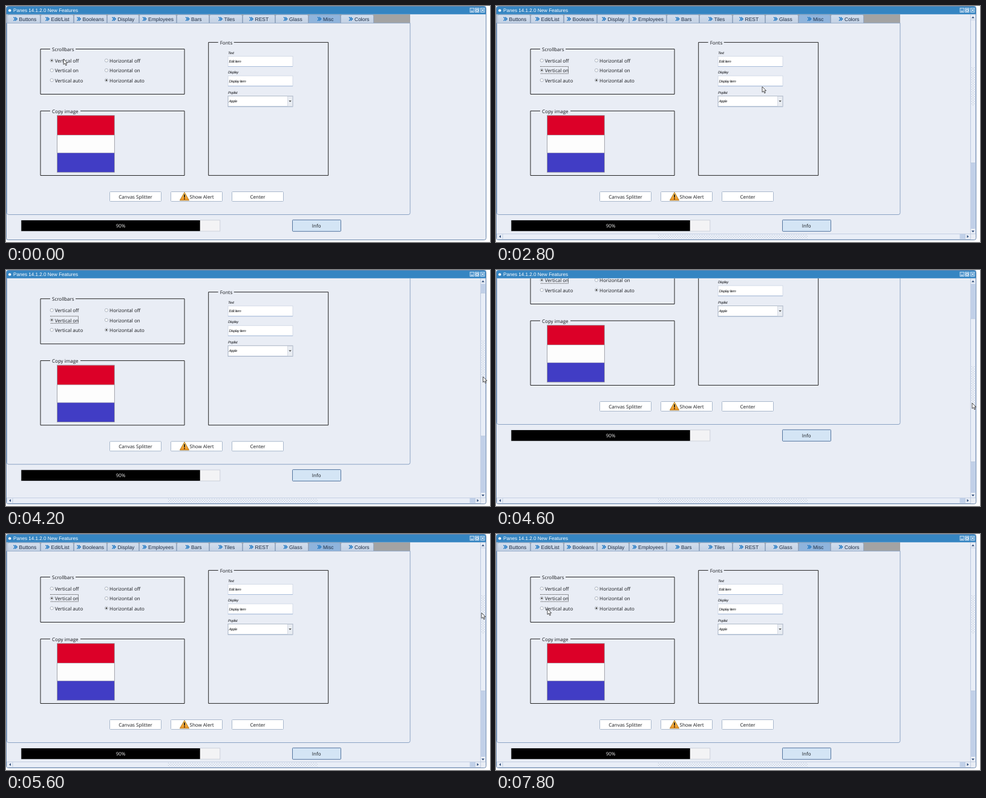
Recreate the animation shown at these times as an HTML page. Size 800 by 392 pixels, loop 8 s.

```html
<!DOCTYPE html>
<html lang="en">
<head>
<meta charset="utf-8">
<title>Panes demo</title>
<style>
  html, body { margin: 0; width: 100%; height: 100%; overflow: hidden; background: #fff; }
  svg { display: block; width: 800px; height: 392px; }
  text { font: 8px "Open Sans", sans-serif; fill: #16181c; text-rendering: geometricPrecision; white-space: pre; }
  .ui { font: 8.5px "Liberation Sans", Arial, sans-serif; fill: #1c2c44; }
  .bar { font: 8.1px "Liberation Sans", Arial, sans-serif; fill: #fff; }
  .hand { font: italic 6px "Liberation Sans", Arial, sans-serif; letter-spacing: -.4px; }
  .mid { text-anchor: middle; }
</style>
</head>
<body>
<svg id="stage" viewBox="0 0 800 392">
  <defs>
    <clipPath id="view"><rect x="1" y="14" width="792" height="374"/></clipPath>
    <linearGradient id="amber" x2="0" y2="1">
      <stop stop-color="#ffd56a"/><stop offset="1" stop-color="#ee8f1c"/>
    </linearGradient>
    <linearGradient id="tab" x2="0" y2="1">
      <stop stop-color="#d3deed"/><stop offset="1" stop-color="#c3d1e4"/>
    </linearGradient>
    <pattern id="grip" width="4" height="4" patternUnits="userSpaceOnUse">
      <path d="M0 0h1v1h-1zM2 2h1v1h-1z" fill="#b3bfd0"/>
    </pattern>
  </defs>
  <rect x=".5" y=".5" width="793" height="388" rx="3" fill="#e9edf5" stroke="#6d89ad"/>
  <g id="content" clip-path="url(#view)"><g id="page"></g></g>
  <path d="M1 13.8V3q0-2 2-2H791q2 0 2 2V13.8z" fill="#3585c2"/>
  <g id="title"></g>
  <g id="bars"></g>
  <path id="cursor" d="M0 0V9.2L2.2 7.2L3.8 10.8L5.3 10.1L3.8 6.7H6.6z" fill="#fff" stroke="#222" stroke-width=".8"/>
</svg>
<script>
const $ = id => document.getElementById(id);
const rect = (x, y, w, h, fill, stroke = 'none', extra = '') =>
  `<rect x="${x}" y="${y}" width="${w}" height="${h}" fill="${fill}" stroke="${stroke}" ${extra}/>`;
const path = (d, stroke, width = 1, fill = 'none') =>
  `<path d="${d}" fill="${fill}" stroke="${stroke}" stroke-width="${width}"/>`;
const text = (x, y, s, cls = '') => `<text x="${x}" y="${y}" class="${cls}">${s}</text>`;

const tabs = [
  ['Buttons', 2, 21.5], ['Edit/List', 57, 74.5], ['Booleans', 112, 126.5], ['Display', 167, 184.5],
  ['Employees', 220, 235], ['Bars', 282, 306], ['Tiles', 336, 360.5], ['REST', 391, 411.5],
  ['Glass', 445, 468], ['Misc', 500, 524], ['Colors', 553, 576]
];

function drawTab([name, x, textX], i) {
  const end = i + 1 < tabs.length ? tabs[i + 1][1] : 608;
  const chevron = dx => path(`M${textX - 9 + dx} 18.6l3 2.9l-3 2.9`, '#1c77c4', 1.4);
  return path(`M${x + .5} 28V16.5q0-2 2-2H${end - 2.5}q2 0 2 2V28`, '#8ea5c3', .8,
      name === 'Misc' ? '#8fb4dc' : 'url(#tab)') +
    chevron(0) + chevron(2.7) + text(textX, 24.6, name, 'ui');
}

function group(label, x, y, w, h, gap) {
  return path(`M${x + 16} ${y}H${x}v${h}h${w}v${-h}H${x + 16 + gap}`, '#222') +
    text(x + 19, y + 3.4, label);
}

function radio(x, y, label, id = '') {
  return `<circle cx="${x}" cy="${y}" r="2.6" fill="#fff" stroke="#9aa3b0" stroke-width=".8"/>` +
    (id ? `<circle id="${id}" cx="${x}" cy="${y}" r="1.2" fill="#222"/>` : '') +
    text(x + 5, y + 3.5, label);
}

const button = (x, label, labelX = x + 43) =>
  rect(x + .5, 308.5, 85, 16, '#fff', '#a9b8cc', 'rx="1"') + text(labelX, 319.8, label, 'mid');

function field(label, y, value, h = 17) {
  return text(367, y - 4, label, 'hand') + rect(367, y, 107, h, '#fff', '#ccd5e3', 'stroke-width=".8"') +
    path(`M367 ${y + h}h107`, '#a9bddb') + text(368.5, y + 10.5, value, 'hand');
}

$('page').innerHTML =
  rect(2, 14, 666, 14, '#a3a3a3') +
  path('M1.5 28.3H668V343.5q0 3-3 3H4.5q-3 0-3-3z', '#8ba3c4', 1, '#e9edf5') +
  tabs.map(drawTab).join('') +
  group('Scrollbars', 57, 71.5, 238, 75, 42) +
  radio(75.7, 90.5, 'Vertical off', 'offDot') +
  radio(75.7, 106.8, 'Vertical on', 'onDot') +
  radio(75.7, 123.2, 'Vertical auto') +
  radio(166, 90.5, 'Horizontal off') +
  radio(166, 106.8, 'Horizontal on') +
  radio(166, 123.2, 'Horizontal auto', 'autoDot') +
  '<path id="focus" d="M73 100.5H119.5V112.3H73" fill="none" stroke="#333" stroke-width=".8" stroke-dasharray="1.5 1"/>' +
  group('Copy image', 57, 174.3, 238, 107.2, 50) +
  rect(85, 182, 94, 32.5, '#dc0028') + rect(85, 214.5, 94, 29.5, '#fdfdfd') +
  rect(85, 244, 94, 32, '#413dc5') + rect(84.5, 181.8, 94.8, 94.4, 'none', '#8f8f98', 'stroke-width=".8"') +
  path('M85 214.5h94M85 244h94', '#a0a0a8', .6) +
  group('Fonts', 334.7, 60.4, 198, 221, 26) +
  field('Text', 83.5, 'Edit item') + field('Display', 116, 'Display item') +
  field('Poplist', 149.5, 'Apple', 17.5) +
  rect(367, 149.5, 107, 17.5, 'none', '#a9b3c2', 'stroke-width=".8"') +
  rect(465.5, 150, 8, 16.7, '#e9edf3', '#c3cad5', 'stroke-width=".6"') +
  path('M467.3 157h4.6l-2.3 2.5z', 'none', 0, '#555') +
  button(171, 'Canvas Splitter') + button(272, 'Show Alert', 323.5) + button(373, 'Center') +
  path('M295 309.5L302.6 322.8H287.4z', '#a8741c', .9, 'url(#amber)') +
  path('M295 313v5.2M295 319.6v1.6', '#111', 1.7) +
  rect(25, 355.8, 328.8, 18.2, '#f3f3f5', '#c5cad4', 'stroke-width=".8"') +
  rect(25.3, 356, 295.4, 17.8, '#000') +
  '<text x="189.5" y="367.9" class="mid" style="fill:#e8e8e8">90%</text>' +
  rect(473.5, 355.3, 80, 19, '#d4e5f5', '#54759f', 'rx="1"') + text(513.2, 367.9, 'Info', 'mid');

$('title').innerHTML =
  '<circle cx="6.2" cy="7.4" r="2.2" fill="#fff"/>' +
  text(12, 10.3, 'Panes 14.1.2.0 New Features', 'bar') +
  [767, 775.5, 784.5].map(x => rect(x, 3.5, 6.5, 7, '#5a9bd0', '#dcecf8', 'stroke-width=".8"')).join('') +
  path('M768.5 8.8h3.5M777 5.5h3.5v3.4H777zM786 5.3l3.5 3.5M789.5 5.3l-3.5 3.5', '#fff', 1);

const track = '#c1d0e8', thumb = '#e9eef7', edge = '#b4c3da', arrow = '#33507c';
$('bars').innerHTML =
  rect(784.3, 14, 8.5, 364.5, thumb, edge, 'stroke-width=".7"') +
  rect(784.6, 23, 8, 347, track) +
  `<g id="thumb">${rect(784.6, 23, 8, 237.5, thumb, edge, 'stroke-width=".7"')}${rect(785, 101, 7, 65, 'url(#grip)')}</g>` +
  path('M786 20.3h4.8l-2.4-3z', 'none', 0, arrow) + path('M786 373h4.8l-2.4 3z', 'none', 0, arrow) +
  rect(1.5, 378.7, 783, 8.6, thumb, edge, 'stroke-width=".7"') +
  rect(766.5, 379, 9, 8, track) + rect(267, 380, 248, 6.5, 'url(#grip)') +
  path('M11 379v8M775.5 379v8', edge, .7) +
  path('M8 380.5v4.8l-3-2.4z', 'none', 0, arrow) + path('M778.5 380.5v4.8l3-2.4z', 'none', 0, arrow);

// Pointer stops: time, x, y
const stops = [
  [0, 95, 88], [800, 95, 88], [1200, 91, 106], [2200, 91, 106], [3400, 789, 162], [4000, 789, 162],
  [4600, 787, 221], [5200, 787, 220], [5600, 786, 131], [6000, 786, 131], [7600, 85, 124.5], [8000, 85, 124.5]
];
const loop = 8000, step = 200, clickTime = 1600;

function pointerAt(t) {
  const i = stops.findIndex(s => s[0] > t);
  const [t0, x0, y0] = stops[i - 1], [t1, x1, y1] = stops[i];
  const p = (t - t0) / (t1 - t0), e = p * p * (3 - 2 * p);
  return [x0 + (x1 - x0) * e, y0 + (y1 - y0) * e];
}

function show(id, visible) { $(id).style.display = visible ? '' : 'none'; }

function draw(now) {
  const t = Math.floor((now % loop) / step) * step;
  const [x, y] = pointerAt(t);
  const scroll = Math.min(1, Math.max(0, (y - 162) / 58));
  const clicked = t >= clickTime;
  $('cursor').setAttribute('transform', `translate(${x} ${y})`);
  $('page').setAttribute('transform', `translate(0 ${-90 * scroll})`);
  $('thumb').setAttribute('transform', `translate(0 ${58 * scroll})`);
  show('offDot', !clicked);
  for (const id of ['onDot', 'focus', 'bars']) show(id, clicked);
  requestAnimationFrame(draw);
}
draw(performance.now());
</script>
</body>
</html>
```
